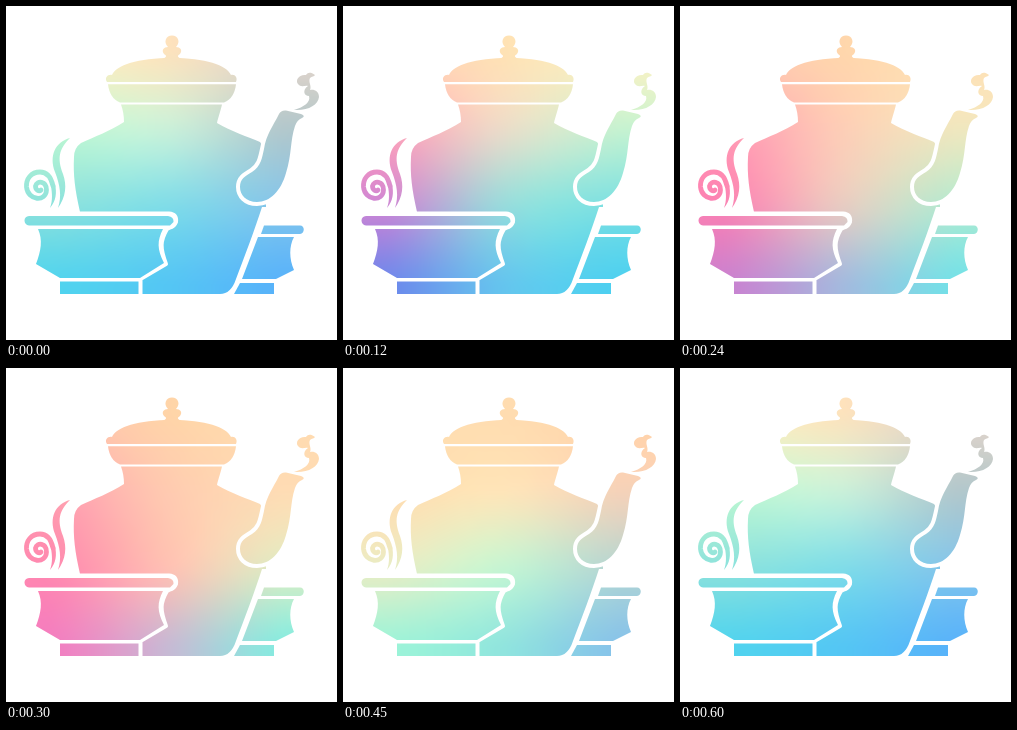
An HTML page with a canvas that plays this animation: 331 by 334 pixels, repeating every 930 ms.

```html
<!DOCTYPE html>
<html lang="en">
<head>
<meta charset="utf-8">
<title>Teapot</title>
<style>
html, body { margin: 0; width: 100%; height: 100%; overflow: hidden; background: #fff; }
canvas { display: block; width: 331px; height: 334px; }
</style>
</head>
<body>
<canvas id="stage" width="331" height="334"></canvas>
<script>
const W = 331, H = 334, LOOP = 930, STEP = 30, END = 600;
const N = 40;

// Colour mesh: three columns by four rows, keyed by time.
const MESH_X = [40, 120], MESH_Y = [40, 80]; // start, spacing
const KEYS = [
  [0,   "fff0c4 fee2bc e6d6cc  c0f6d0 ccf0d8 b4c8cc  8ce2dc 80dce8 84c4ea  50d4ee 54c6f4 58b2fa"],
  [120, "ffd4b8 ffe2b4 fff0c4  ffa4b8 ecdcc8 c8f2d0  cc86d4 98dadc 7ce0e2  6c88ec 64c4ee 4cd0f0"],
  [180, "ffd0b8 ffd8b0 fee4bc  ff98b8 fcd0bc e2f2c8  f47cb8 d0d4d0 88e8de  a084e0 80b8e8 60d6f0"],
  [300, "ffc4b0 ffd4a8 ffdcb0  ffa0b0 ffcab0 ffdcb4  ff88b0 ffc0b4 dcecc4  f47cc0 c8b8d4 84ece0"],
  [375, "ffd0b0 ffd8a8 ffd8b0  ffc4b0 ffd8b0 ffdcb4  ffbcb0 f4e0bc d0e4c8  e8d0c0 b8e8d0 88dce4"],
  [450, "ffdcb0 ffdcb0 ffd4a8  ffdcb0 ffe4b8 f6d2b8  e8ecc4 c6f4d2 b6d4d2  9cf4d8 90e4de 86c2ea"],
  [540, "ffecc0 ffe4bc ffdcc4  e2f6cc e4ecd0 d0ccc8  a6ecd8 96e4dc 98c8e0  60daec 64d0f0 62b6f6"]
].map(([t, s]) => ({ t, c: s.split(/\s+/).map(rgb) }));
KEYS.push({ t: END, c: KEYS[0].c });

const FILLS = [
  // finial and lid
  "M156 53C161 51 161 50 158 48C155 44 158 41 162 41C157 36 160 29.500 166 29.500C172 29.500 175 36 170 41C174 41 177 44 174 48C171 50 171 51 176 53Z",
  "M106 69C110 59 132 52 166 52C199 52 221 59 225 69C229 68 232 72 230 76H101C98 72 102 68 106 69Z",
  "M102 78.300H230C229 87 225 94 218 96.500H114C107 94 103 87 102 78.300Z",
  // body
  "M115 98.500H216C214 107 212 112 211 117C225 125 242 131 254 136L260 145V201H256C249 223 238 252 230 273Q225 288 214 288H72L74 206C69 184 67 169 68 151Q68 142 75 137C88 131 104 125 118 116C118 110 117 104 115 98.500Z",
  // right cup
  "M258 219.500H294C299 219.500 299 227.500 294 228H255Z",
  "M252 231H288C283 240 283 253 288 264L270 273H236Z",
  "M234 277H268V288H228Z"
];

const SPOUT = "M273 108Q275 104 280 104.500L295 108Q300 110 296 112Q291 114 289 120C284 135 286 148 280 167C275 185 264 196 251 196C240 196 234 189 234 181C234 173 239 170 246 166C255 160 256 152 258 143C260 129 267 120 273 108Z";

const BOWL_EDGE = "M18 207.500H163Q171 208 170 216Q168 221 164 221.500L161 223C154 235 154 242 160 258L134.500 273V290H16V207.500Z";
const BOWL = [
  "M23 210H162Q168 211 167.500 216L164 219.500H23C17 219 17 210 23 210Z",
  "M32 223H157C151 235 151 243 158 257L134 272H54L30 258C35 245 37 234 32 223Z",
  "M54 275.500H132.500V288H54Z"
];

const STEAM = [
  "M64 132C49 136 43 150 49 166C54 179 56 190 52 202C60 191 61 179 57 168C51 152 53 143 64 132Z",
  "M309 69C304 65 301 67 300 69C293 68 289 74 292 78C295 82 299 79 302 80C296 84 298 90 303 90C305 96 298 101 288 104C302 105 312 99 313 91C313 85 308 83 304 84C306 80 302 76 304 72C306 70 308 71 309 69Z",
  "M44 202C47 194 46 187 45 180L49 178C51 187 50 195 44 202Z"
];
const CURL = "M47 180C45 171 41 166 34 166C25 166 20 173 20.500 181C22 195 40 196 40.500 184C40.500 175 31 174 29.500 180C29.500 184 33 186 35 184";

function rgb(hex) {
  return [0, 2, 4].map(i => parseInt(hex.substr(i, 2), 16));
}

const ctx = document.getElementById("stage").getContext("2d");

function layer(w, h) {
  const c = document.createElement("canvas");
  c.width = w;
  c.height = h;
  return c;
}

function drawMask() {
  const c = layer(W, H), g = c.getContext("2d");
  const fill = d => g.fill(new Path2D(d));
  const erase = (d, width) => {
    g.globalCompositeOperation = "destination-out";
    g.lineWidth = width;
    g.stroke(new Path2D(d));
    fill(d);
    g.globalCompositeOperation = "source-over";
  };
  g.lineJoin = g.lineCap = "round";
  FILLS.forEach(fill);
  erase(SPOUT, 8);
  fill(SPOUT);
  erase(BOWL_EDGE, 4);
  BOWL.forEach(fill);
  STEAM.forEach(fill);
  g.lineWidth = 4.8;
  g.stroke(new Path2D(CURL));
  return c;
}

const mask = drawMask();
const small = layer(N, N);
const sctx = small.getContext("2d");
const pixels = sctx.createImageData(N, N);

function spline(p, u) {
  const last = p.length - 1;
  const i = Math.max(0, Math.min(last - 1, Math.floor(u)));
  const f = Math.max(0, Math.min(1, u - i));
  const a = p[Math.max(0, i - 1)], b = p[i], c = p[i + 1], d = p[Math.min(last, i + 2)];
  return b + f / 2 * (c - a + f * (2 * a - 5 * b + 4 * c - d + f * (3 * (b - c) + d - a)));
}

function meshAt(t) {
  let i = 0;
  while (i < KEYS.length - 2 && t >= KEYS[i + 1].t) i++;
  const a = KEYS[i], b = KEYS[i + 1], f = (t - a.t) / (b.t - a.t);
  return a.c.map((col, k) => col.map((v, ch) => v + (b.c[k][ch] - v) * f));
}

function paintField(mesh) {
  for (let ch = 0; ch < 3; ch++) {
    const rows = [0, 3, 6, 9].map(r => mesh.slice(r, r + 3).map(c => c[ch]));
    for (let x = 0; x < N; x++) {
      const u = ((x + 0.5) * W / N - MESH_X[0]) / MESH_X[1];
      const column = rows.map(r => spline(r, u));
      for (let y = 0; y < N; y++) {
        const v = ((y + 0.5) * H / N - MESH_Y[0]) / MESH_Y[1];
        pixels.data[(y * N + x) * 4 + ch] = spline(column, v);
      }
    }
  }
  for (let i = 3; i < pixels.data.length; i += 4) pixels.data[i] = 255;
  sctx.putImageData(pixels, 0, 0);
}

let shown = -1;

function render(now) {
  const t = Math.min(END, Math.floor((now % LOOP) / STEP) * STEP);
  if (t !== shown) {
    shown = t;
    paintField(meshAt(t));
    ctx.globalCompositeOperation = "source-over";
    ctx.clearRect(0, 0, W, H);
    ctx.drawImage(mask, 0, 0);
    ctx.globalCompositeOperation = "source-in";
    ctx.imageSmoothingQuality = "high";
    ctx.drawImage(small, 0, 0, W, H);
  }
}

let start = null;
function tick(now) {
  if (start === null) start = now;
  render(now - start);
  requestAnimationFrame(tick);
}
render(0);
requestAnimationFrame(tick);
</script>
</body>
</html>
```
